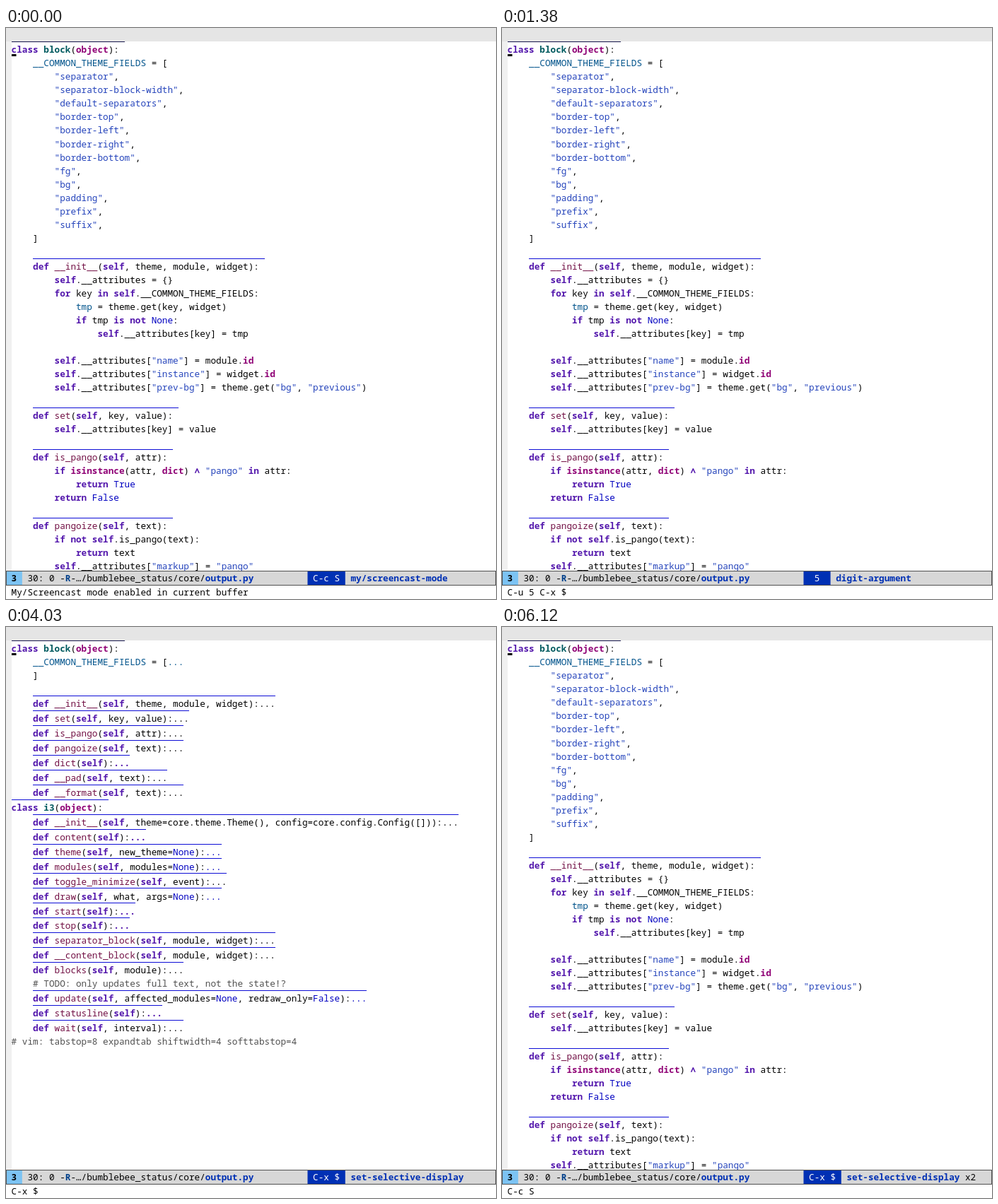
An HTML page with a canvas for the animation above (6840 ms loop, 693x808 px).

```html
<!DOCTYPE html>
<html lang="en">
<head>
<meta charset="utf-8">
<title>Selective display</title>
<style>
  html, body { margin: 0; width: 100%; height: 100%; overflow: hidden; background: #fff; }
  canvas { display: block; }
</style>
</head>
<body>
<canvas id="stage" width="693" height="808"></canvas>
<script>
const ctx = document.getElementById('stage').getContext('2d');
const W = 693, H = 808;
const S = 0.952;              // editor pixels to stage pixels
const CW = 8 * S;             // character cell width
const FONT = '12.7px "Noto Sans Mono", "DejaVu Sans Mono", monospace';
const LOOP = 6840;

const plain = ['#000000', false];
const faces = {
  keyword: ['#5317ac', true],
  builtin: ['#8f0075', true],
  type: ['#005a5f', true],
  func: ['#721045', false],
  string: ['#2544bb', false],
  variable: ['#00538b', false],
  constant: ['#0000c0', false],
  comment: ['#505050', false]
};
const blue = '#0030b4';

const words = {};
const define = (face, list) => list.split(' ').forEach(w => words[w] = faces[face]);
define('keyword', 'class def self for in if is not return ∧');
define('builtin', 'object isinstance dict id');
define('constant', 'None True False');

const expanded = `class block(object):
    __COMMON_THEME_FIELDS = [
        "separator",
        "separator-block-width",
        "default-separators",
        "border-top",
        "border-left",
        "border-right",
        "border-bottom",
        "fg",
        "bg",
        "padding",
        "prefix",
        "suffix",
    ]

    def __init__(self, theme, module, widget):
        self.__attributes = {}
        for key in self.__COMMON_THEME_FIELDS:
            tmp = theme.get(key, widget)
            if tmp is not None:
                self.__attributes[key] = tmp

        self.__attributes["name"] = module.id
        self.__attributes["instance"] = widget.id
        self.__attributes["prev-bg"] = theme.get("bg", "previous")

    def set(self, key, value):
        self.__attributes[key] = value

    def is_pango(self, attr):
        if isinstance(attr, dict) ∧ "pango" in attr:
            return True
        return False

    def pangoize(self, text):
        if not self.is_pango(text):
            return text
        self.__attributes["markup"] = "pango"`.split('\n');

// A trailing ellipsis marks a folded body.
const folded = `class block(object):
    __COMMON_THEME_FIELDS = […
    ]

    def __init__(self, theme, module, widget):…
    def set(self, key, value):…
    def is_pango(self, attr):…
    def pangoize(self, text):…
    def dict(self):…
    def __pad(self, text):…
    def __format(self, text):…
class i3(object):
    def __init__(self, theme=core.theme.Theme(), config=core.config.Config([])):…
    def content(self):…
    def theme(self, new_theme=None):…
    def modules(self, modules=None):…
    def toggle_minimize(self, event):…
    def draw(self, what, args=None):…
    def start(self):…
    def stop(self):…
    def separator_block(self, module, widget):…
    def __content_block(self, module, widget):…
    def blocks(self, module):…
    # TODO: only updates full text, not the state!?
    def update(self, affected_modules=None, redraw_only=False):…
    def statusline(self):…
    def wait(self, interval):…
# vim: tabstop=8 expandtab shiftwidth=4 softtabstop=4`.split('\n');

const states = [
  { at: 0, code: expanded, key: ' C-c S ', cmd: 'my/screencast-mode',
    echo: 'My/Screencast mode enabled in current buffer' },
  { at: 1000, code: expanded, key: ' C-u ', cmd: 'universal-argument', echo: 'C-u-' },
  { at: 1380, code: expanded, key: '  5  ', cmd: 'digit-argument', echo: 'C-u 5 C-x $' },
  { at: 2500, code: folded, key: ' C-x $ ', cmd: 'set-selective-display', echo: 'C-x $' },
  { at: 5050, code: expanded, key: ' C-x $ ', cmd: 'set-selective-display', count: 'x2', echo: 'C-c S' }
];

function rect(color, x, y, w, h) {
  ctx.fillStyle = color;
  ctx.fillRect(x, y, w, h);
}

// Draws text at a cell column; base is in editor pixels.
function put(text, col, base, [color, bold] = plain) {
  ctx.font = (bold ? 'bold ' : '') + FONT;
  ctx.fillStyle = color;
  [...text].forEach((ch, i) => {
    if (ch !== ' ') ctx.fillText(ch, (col + i) * CW, base * S);
  });
}

function faceOf(token, line, at, prev) {
  if (token[0] === '"') return faces.string;
  if (token[0] === '#') return faces.comment;
  if (prev === 'def') return faces.func;
  if (prev === 'class') return faces.type;
  const starts = !line.slice(0, at).trim();
  if (starts && /^\w+ = /.test(line.slice(at))) return faces.variable;
  return Object.hasOwn(words, token) ? words[token] : plain;
}

function drawLine(line, base) {
  const fold = line.endsWith('…');
  const text = fold ? line.slice(0, -1) : line;
  let prev = '', last = plain;
  for (const m of text.matchAll(/"[^"]*"|#.*|\w+|[^\s\w"]+/g)) {
    const face = faceOf(m[0], text, m.index, prev);
    put(m[0], m.index + 1, base, face);
    if (/\w/.test(m[0])) last = face;
    prev = m[0];
  }
  if (fold) put('...', text.length + 1, base, last);
}

function drawCode(lines) {
  let y = 20;
  ctx.save();
  ctx.beginPath();
  ctx.rect(0, 0, W, 768);
  ctx.clip();
  for (const line of lines) {
    if (/^ *(class|def) /.test(line)) {
      const left = Math.round((line.search(/\S/) + 1) * CW);
      const cells = line.length + (line.endsWith('…') ? 3 : 2);
      rect(y === 20 ? '#18184c' : '#0d0dd6', left, Math.round(y * S), Math.round(cells * CW) - left, 1);
      y += 2;
    }
    drawLine(line, y + 15);
    y += 20;
  }
  rect('#000', 8, 37, 6.5, 3);
  ctx.restore();
}

function drawModeLine({ key, cmd, count }) {
  const top = 768, h = 21, base = 823;
  rect('#d7d7d7', 0, top, W, h);
  rect('#7cc3f3', 0, top, 3 * CW, h);
  rect(blue, 56 * CW, top, key.length * CW, h);
  ctx.strokeStyle = '#505050';
  ctx.lineWidth = 1;
  ctx.strokeRect(0.5, top + 0.5, W - 1, h - 1);
  put('3', 1, base, ['#000', true]);
  put('30: 0 - -…/bumblebee_status/core/', 4, base);
  put('R', 11, base, ['#003f8a', true]);
  put('output.py', 37, base, [blue, true]);
  put(key, 56, base, ['#fff', false]);
  const col = 57 + key.length;
  put(cmd, col, base, [blue, true]);
  if (count) put(count, col + cmd.length + 1, base);
}

function draw(state) {
  rect('#fff', 0, 0, W, H);
  rect('#e5e5e5', 0, 0, W, 19);
  rect('#f0f0f0', 0, 19, 8, 749);
  drawCode(state.code);
  drawModeLine(state);
  put(state.echo, 1, 844);
}

let shown = null;
const start = performance.now();
function tick() {
  const t = (performance.now() - start) % LOOP;
  const state = states.findLast(s => s.at <= t);
  if (state !== shown) draw(shown = state);
  requestAnimationFrame(tick);
}
tick();
</script>
</body>
</html>
```
